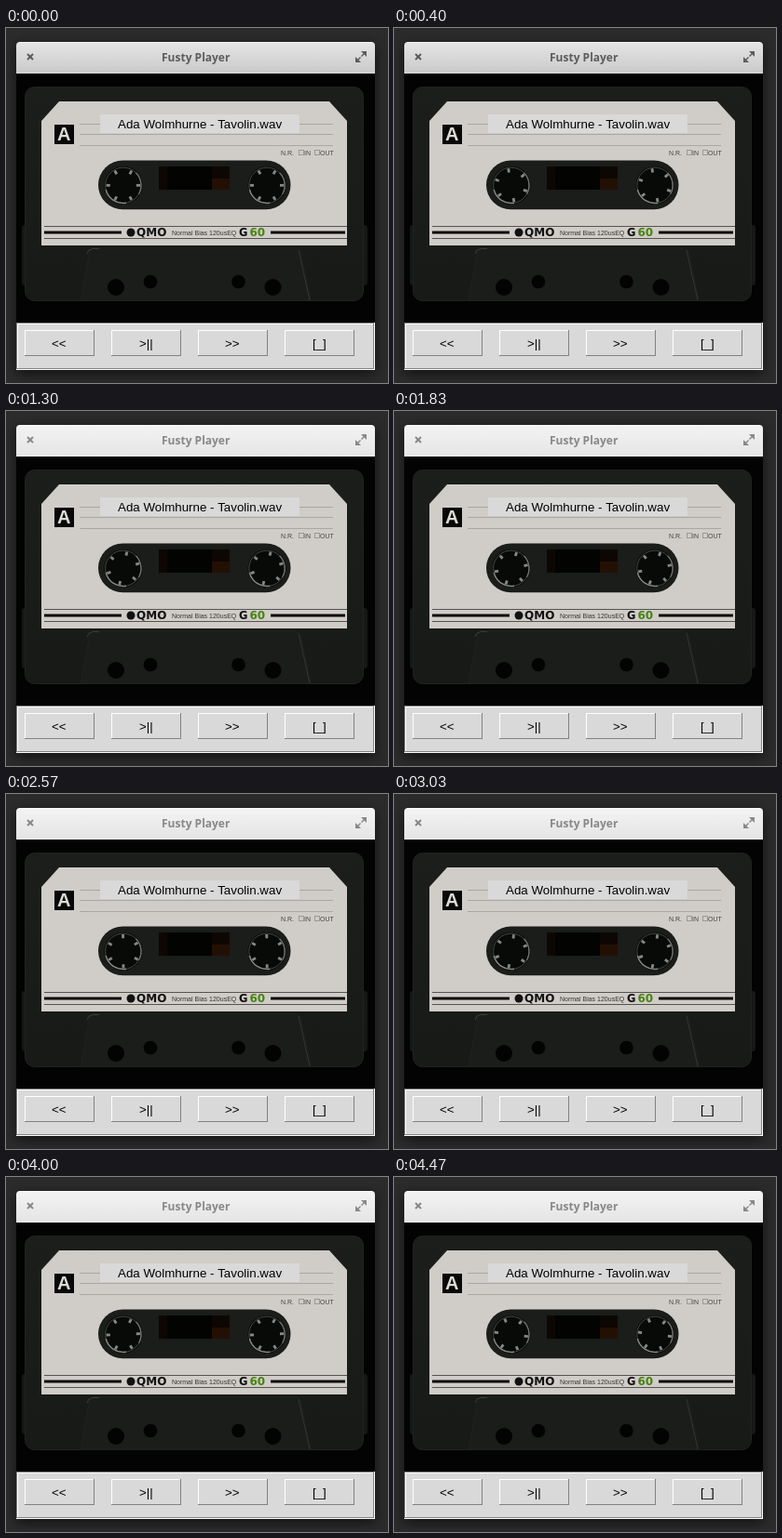
Recreate the animation shown at these times as an HTML page with a canvas. Size 410 px wide and 382 px high, loop 4.51 s.

```html
<!DOCTYPE html>
<html lang="en">
<head>
<meta charset="utf-8">
<title>Cassette</title>
<style>
  html, body { margin: 0; width: 100%; height: 100%; overflow: hidden; background: #2b2b2b; }
  canvas { display: block; width: 410px; height: 382px; }
</style>
</head>
<body>
<canvas id="stage" width="410" height="382"></canvas>
<script>
const ctx = document.getElementById('stage').getContext('2d');
const LOOP = 4510, STEPS = 133;
const TURN = Math.PI * 8 / 3; // whole number of tooth spacings per loop
const SANS = '"Liberation Sans", Arial, sans-serif';
const WIDE = '"DejaVu Sans", sans-serif';

function rect(x, y, w, h, color) {
  ctx.fillStyle = color;
  ctx.fillRect(x, y, w, h);
}

function round(x, y, w, h, r, fill, stroke) {
  ctx.beginPath();
  ctx.roundRect(x, y, w, h, r);
  if (fill) { ctx.fillStyle = fill; ctx.fill(); }
  if (stroke) { ctx.strokeStyle = stroke; ctx.lineWidth = 1; ctx.stroke(); }
}

function disc(x, y, r, color) {
  ctx.beginPath();
  ctx.arc(x, y, r, 0, Math.PI * 2);
  ctx.fillStyle = color;
  ctx.fill();
}

function path(points, fill, stroke, width = 1) {
  ctx.beginPath();
  points.forEach(([x, y], i) => i ? ctx.lineTo(x, y) : ctx.moveTo(x, y));
  if (fill) { ctx.closePath(); ctx.fillStyle = fill; ctx.fill(); }
  if (stroke) { ctx.strokeStyle = stroke; ctx.lineWidth = width; ctx.stroke(); }
}

function text(str, x, y, font, color) {
  ctx.font = font;
  ctx.fillStyle = color;
  ctx.fillText(str, x, y);
}

// Centres text on whole pixels, as a desktop toolkit does.
function centered(str, x, y, font, color) {
  ctx.font = font;
  text(str, Math.round(x - ctx.measureText(str).width / 2), y, font, color);
}

function vertical(y0, y1, from, to) {
  const g = ctx.createLinearGradient(0, y0, 0, y1);
  g.addColorStop(0, from);
  g.addColorStop(1, to);
  return g;
}

const mix = (a, b, k) => {
  const v = Math.round(a + (b - a) * k);
  return `rgb(${v},${v},${v})`;
};

function drawTitleBar(fade) {
  const top = mix(229, 243, fade), bottom = mix(202, 229, fade);
  const ink = mix(92, 136, fade);
  round(11, 15, 385, 34, [4, 4, 0, 0], vertical(15, 48, top, bottom));
  rect(14, 15, 379, 1, mix(244, 251, fade));
  rect(11, 48, 385, 1, mix(215, 232, fade));
  centered('Fusty Player', 204, 35.5, 'bold 12px "Open Sans", sans-serif', ink);

  path([[23, 28], [29, 34]], null, ink, 2);
  path([[29, 28], [23, 34]], null, ink, 2);
  path([[381, 25], [387, 25], [387, 31]], ink);
  path([[375, 31], [375, 37], [381, 37]], ink);
  path([[385, 27], [381.5, 30.5]], null, ink, 1.5);
  path([[377, 35], [380.5, 31.5]], null, ink, 1.5);
}

function drawShell() {
  rect(11, 49, 385, 268, '#020302');
  round(17, 212, 371, 65, 3, '#151815');
  round(20.5, 63.5, 363, 230, 10, vertical(63, 294, '#1b1e1b', '#171a17'), '#1f221f');
  path([[80, 293], [90, 240], [93, 237], [312, 237], [316, 240], [327, 293]], '#1a1d1a', '#1f221f');
  path([[87, 243], [89, 239], [93, 237.5], [100, 237.5]], null, '#3a3d3a');
  path([[314, 239], [326, 293]], null, '#323532');
  for (const [x, y, r] of [[118, 279, 9], [155, 273, 7.3], [249.5, 273, 7.3], [286.5, 279, 9]]) {
    disc(x, y, r, '#020302');
  }
}

function drawLabel() {
  path([[38, 100], [57, 79], [347, 79], [366, 100], [366, 234], [38, 234]], '#d0ccc8');
  for (const y of [103, 114, 126]) rect(79, y, 272, 1, '#aaa6a2');

  rect(52, 104, 21, 21, '#080808');
  centered('A', 62.5, 121, `bold 20px ${SANS}`, '#dedbd7');

  rect(101, 93, 214, 20, '#d9d9d9');
  centered('Ada Wolmhurne - Tavolin.wav', 208, 108, `13.33px ${SANS}`, '#000');

  const small = `7px ${SANS}`;
  text('N.R.', 295, 137, small, '#444');
  text('IN', 320, 137, small, '#444');
  text('OUT', 337, 137, small, '#444');
  ctx.strokeStyle = '#999';
  ctx.lineWidth = 1;
  ctx.strokeRect(314.5, 131.5, 5, 5);
  ctx.strokeRect(331.5, 131.5, 5, 5);

  rect(41, 213, 325, 1, '#55524f');
  rect(41, 226, 325, 1, '#55524f');
  rect(41, 218.5, 83, 3, '#080808');
  rect(284, 218.5, 80, 3, '#080808');
  disc(134, 220, 4.5, '#111');
  text('QMO', 140, 224, `bold 12px ${WIDE}`, '#111');
  text('Normal Bias 120usEQ', 178, 222.5, small, '#333');
  text('G', 250, 224, `bold 11.5px ${WIDE}`, '#111');
  text('60', 261.5, 224, `bold 12px ${WIDE}`, '#478412');
}

function drawWindow() {
  round(99, 142.5, 206.5, 52.8, 26.4, '#1a1d1a');
  rect(164, 149, 76, 25, '#030302');
  rect(164, 149, 9, 25, '#0d0704');
  rect(221, 149, 19, 13, '#0d0704');
  rect(221, 162, 19, 12, '#231004');
}

function arc(r, from, to, color, width) {
  ctx.beginPath();
  ctx.arc(0, 0, r, from, to);
  ctx.strokeStyle = color;
  ctx.lineWidth = width;
  ctx.stroke();
}

function drawReel(x, angle) {
  ctx.save();
  ctx.translate(x, 169.3);
  disc(0, 0, 20.5, '#080a08');
  arc(19.2, 0, Math.PI * 2, '#454845', 1);
  arc(19.2, 1.4, 2.9, '#858884', 1.5);
  arc(19.2, 5.5, 6.8, '#727571', 1.3);
  ctx.rotate(angle);
  for (let i = 0; i < 6; i++) {
    rect(14, -1.4, 4.2, 2.8, '#858883');
    ctx.rotate(Math.PI / 3);
  }
  ctx.restore();
}

function drawButtons() {
  rect(11, 317, 385, 51, '#fff');
  rect(11, 317, 384, 50, '#828282');
  rect(12, 318, 382, 48, '#fff');
  rect(13, 319, 381, 47, '#d9d9d9');
  ['<<', '>||', '>>', '[_]'].forEach((label, i) => {
    const x = 20 + i * 93;
    rect(x, 325, 75, 28, '#828282');
    rect(x, 325, 74, 27, '#fff');
    rect(x + 1, 326, 73, 26, '#d9d9d9');
    centered(label, x + 37, 344, `13.33px ${SANS}`, '#000');
  });
}

function drawBackdrop() {
  rect(0, 0, 410, 382, '#2b2b2b');
  ctx.save();
  ctx.shadowColor = 'rgba(0,0,0,.6)';
  ctx.shadowBlur = 14;
  ctx.shadowOffsetY = 4;
  round(11, 15, 385, 353, 4, '#111');
  ctx.restore();
}

function draw(time) {
  const step = Math.floor(time / LOOP * STEPS);
  const angle = -TURN * step / STEPS;
  const fade = Math.min(1, Math.max(0, (time - 880) / 170));
  drawBackdrop();
  drawTitleBar(fade);
  drawShell();
  drawLabel();
  drawWindow();
  drawReel(125.8, angle);
  drawReel(280, angle);
  drawButtons();
}

const start = performance.now();
function tick() {
  draw((performance.now() - start) % LOOP);
  requestAnimationFrame(tick);
}
tick();
</script>
</body>
</html>
```
